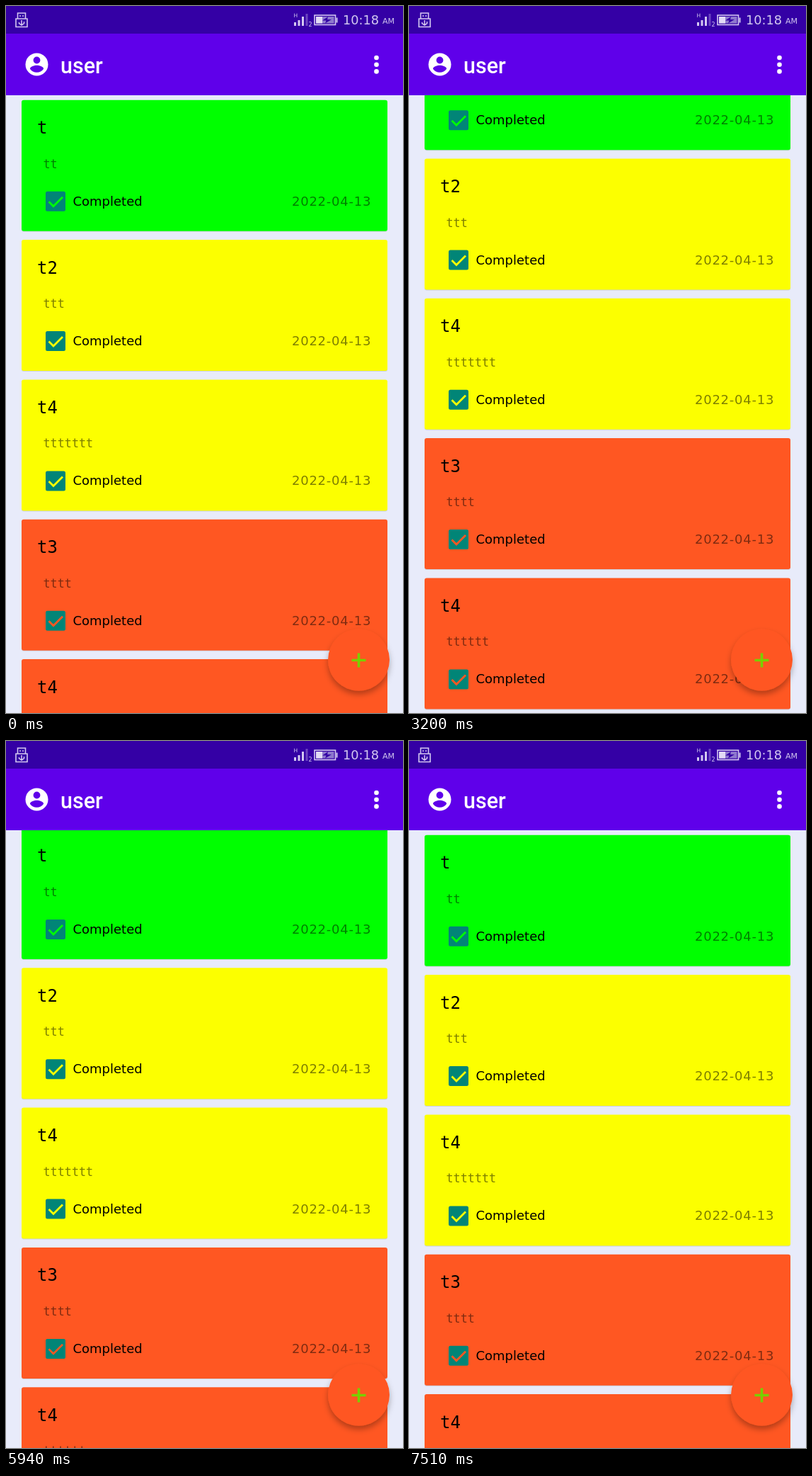
An HTML page for the animation above (8800 ms loop, 561 by 998 pixels).

```html
<!DOCTYPE html>
<html lang="en">
<head>
<meta charset="utf-8">
<title>Task list</title>
<style>
  html, body { margin: 0; width: 100%; height: 100%; overflow: hidden; background: #e8ebfa; }
  svg { display: block; width: 561px; height: 998px; font-family: "DejaVu Sans", sans-serif; }
  .mono { font-family: "DejaVu Sans Mono", monospace; }
  .line { fill: none; stroke: #d3c8f0; stroke-width: 1.6; }
</style>
</head>
<body>
<svg viewBox="0 0 561 998">
  <defs>
    <filter id="shadow" x="-30%" y="-30%" width="160%" height="160%">
      <feDropShadow dx="0" dy="5" stdDeviation="4" flood-opacity=".3"/>
    </filter>
  </defs>
  <rect width="561" height="998" fill="#e8ebfa"/>
  <g id="list"></g>

  <!-- Add button -->
  <circle cx="498.5" cy="923" r="43.5" fill="#ff5722" filter="url(#shadow)"/>
  <path d="M488.5 923.5h20M498.5 913.5v20" stroke="#78d000" stroke-width="3.6"/>

  <!-- App bar -->
  <rect y="39" width="561" height="87" fill="#5f00ea"/>
  <g transform="translate(43.5 82.5)">
    <circle r="16" fill="#fff"/>
    <circle cy="-6" r="4.9" fill="#5f00ea"/>
    <path d="M-9.6 6.2C-9.6 3-3.2 1.3 0 1.3S9.6 3 9.6 6.2A11.5 11.5 0 0 1-9.6 6.2Z" fill="#5f00ea"/>
  </g>
  <text x="77" y="95" fill="#fff" font-size="30.5" font-weight="500" style="font-family:Roboto,sans-serif">user</text>
  <g fill="#fff">
    <circle cx="523.5" cy="73" r="3.3"/>
    <circle cx="523.5" cy="82.7" r="3.3"/>
    <circle cx="523.5" cy="92.4" r="3.3"/>
  </g>

  <!-- Status bar -->
  <rect width="561" height="39" fill="#3400a5"/>
  <g class="line">
    <path d="M16.5 18V10H27.5V18M14 18H30V29.5H14Z"/>
    <path d="M19 14h2M23 14h2M22 20v8M18.5 23v1.5L22 27l3.5-2.5V22" stroke-width="1.5"/>
    <rect x="436" y="13" width="29.5" height="13.5"/>
    <path d="M467.5 16.5v7" stroke-width="2"/>
  </g>
  <rect x="438" y="15" width="25.5" height="9.5" fill="#8e78cd"/>
  <rect x="438" y="15" width="9" height="9.5" fill="#e2daf5"/>
  <path d="M447 20.5L455 15L454 19H460L451 24.5L452.5 20.5Z" fill="#3400a5"/>
  <g fill="#d3c8f0">
    <path d="M407 23h3v5h-3zM412.5 20h3v8h-3zM418 15h3v13h-3z"/>
    <path d="M423.5 11h3v17h-3z" opacity=".35"/>
    <text x="406.5" y="16" font-size="7.5">H</text>
    <text x="427.5" y="29" font-size="8">2</text>
    <text x="476" y="26" font-size="17.7">10:18</text>
    <text x="532" y="25" font-size="11">AM</text>
  </g>
</svg>
<script>
  const list = document.getElementById('list');
  const GREEN = '#00ff00', YELLOW = '#fcff00', ORANGE = '#ff5722';
  const tasks = [
    ['t', 'tt', GREEN],
    ['t2', 'ttt', YELLOW],
    ['t4', 'ttttttt', YELLOW],
    ['t3', 'tttt', ORANGE],
    ['t4', 'tttttt', ORANGE]
  ];

  const card = ([title, note, color], i) => `
    <g transform="translate(0 ${132.8 + i * 197.3})">
      <rect x="22" y="1" width="517" height="185" rx="3" opacity=".12"/>
      <rect x="22" width="517" height="185" rx="3" fill="${color}"/>
      <text class="mono" x="44" y="47.5" font-size="24">${title}</text>
      <text class="mono" x="52.5" y="96" font-size="16.8" opacity=".5">${note}</text>
      <rect x="56" y="129" width="28" height="28" rx="2.5" fill="#018577"/>
      <path d="M60.5 143.5L67 150L80 137" fill="none" stroke="${color}" stroke-width="2.8"/>
      <text x="94.5" y="149" font-size="18">Completed</text>
      <text x="404" y="149" font-size="18" letter-spacing=".75" opacity=".5">2022-04-13</text>
    </g>`;
  list.innerHTML = tasks.map(card).join('');

  // Scroll offset over time: [ms, px]
  const keys = [
    [0, 0], [2610, 0], [2620, 1], [2660, 22], [2700, 56], [2740, 86], [2780, 105.5], [2820, 112], [2860, 114.6],
    [4450, 114.6], [4470, 97.5], [4510, 62], [4560, 28], [4620, 9], [4700, 0],
    [5920, 0], [5940, 9], [5980, 42], [6030, 78], [6090, 103], [6170, 114.6],
    [7170, 114.6], [7190, 102], [7220, 70], [7260, 32], [7300, 10], [7350, 0], [8800, 0]
  ];

  function scrollAt(t) {
    const i = keys.findIndex(k => k[0] > t);
    const [t0, y0] = keys[i - 1], [t1, y1] = keys[i];
    return y0 + (y1 - y0) * (t - t0) / (t1 - t0);
  }

  const start = performance.now();
  function draw() {
    const t = (performance.now() - start) % 8800;
    list.setAttribute('transform', `translate(0 ${-scrollAt(t)})`);
    requestAnimationFrame(draw);
  }
  draw();
</script>
</body>
</html>
```
